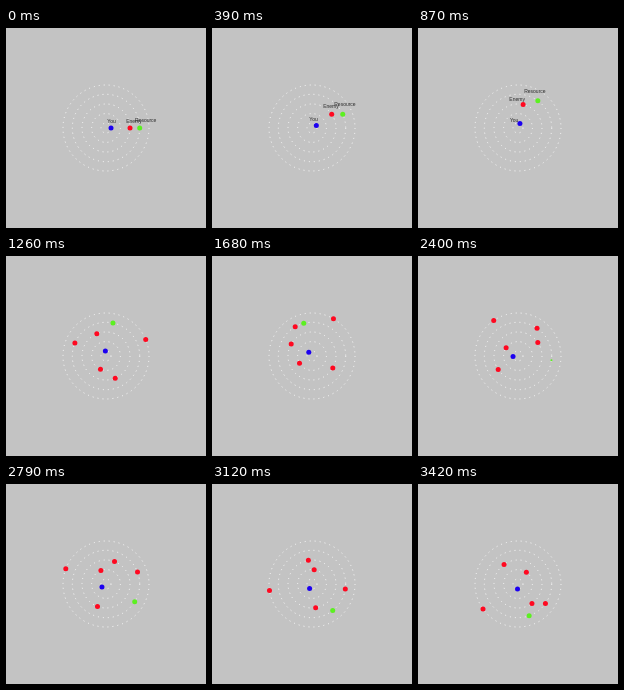
Recreate the animation shown at these times as an HTML page. Size 200 by 200 pixels, loop 3.52 s.

```html
<!DOCTYPE html>
<html lang="en">
<head>
<meta charset="utf-8">
<title>Orbits</title>
<style>
  html, body { margin: 0; height: 100%; overflow: hidden; background: #c3c3c3; }
  svg { display: block; width: 200px; height: 200px; }
  .ring { fill: none; stroke: #fff; stroke-width: .9; stroke-dasharray: 1 4; }
  text { font: 5px "Liberation Sans", Arial, sans-serif; fill: #2a2a2a; text-anchor: middle; }
</style>
</head>
<body>
<svg id="stage" viewBox="0 0 200 200"></svg>
<script>
const LOOP = 3520, STEP = 30, LAST = 114;
const CENTER = 100, DOT = 2.5;
const BLUE = '#1c00f0', RED = '#ff0820', GREEN = '#5cf021';
const ENEMY_SPEED = 2.68, RESOURCE_SPEED = 1.86, RESPAWN = 76;

const stage = document.getElementById('stage');

function add(tag, attrs) {
  const el = document.createElementNS('http://www.w3.org/2000/svg', tag);
  set(el, attrs);
  return stage.appendChild(el);
}

function set(el, attrs) {
  for (const key in attrs) el.setAttribute(key, attrs[key]);
}

const ramp = (n, from, to) => Math.min(1, Math.max(0, (n - from) / (to - from)));
const always = () => 1;
const enemySize = n => ramp(n, 30, 36);
const resourceSize = n => n < RESPAWN ? 1 - ramp(n, 70, RESPAWN) : ramp(n, RESPAWN, 86);

// The resource respawns at its starting point and circles the other way.
const resourceAngle = n => RESOURCE_SPEED * (n < RESPAWN ? n : RESPAWN - n);
const enemyAngle = (start, direction) => n => start + direction * ENEMY_SPEED * n;

for (const r of [5, 14.4, 24, 33.7, 43]) {
  add('circle', { class: 'ring', cx: CENTER, cy: CENTER, r });
}

// dx, dy: label centre relative to its body at angle zero.
const bodies = [
  { r: 5, color: BLUE, angle: n => 2.32 * n, size: always, label: 'You', dx: .5, dy: -6.5 },
  { r: 24, color: RED, angle: enemyAngle(0, 1), size: always, label: 'Enemy', dx: 4, dy: -7 },
  { r: 33.7, color: GREEN, angle: resourceAngle, size: resourceSize, label: 'Resource', dx: 6, dy: -8 },
  { r: 14.4, color: RED, angle: enemyAngle(0, -1), size: enemySize },
  { r: 24, color: RED, angle: enemyAngle(180, 1), size: enemySize },
  { r: 33.7, color: RED, angle: enemyAngle(270, -1), size: enemySize },
  { r: 43, color: RED, angle: enemyAngle(-90, 1), size: enemySize }
];

for (const body of bodies) body.dot = add('circle', { fill: body.color });
for (const body of bodies) {
  if (!body.label) continue;
  body.text = add('text', {});
  body.text.textContent = body.label;
}

// Rotates an offset counter-clockwise about the centre of the stage.
function orbit(x, y, degrees) {
  const a = degrees * Math.PI / 180, c = Math.cos(a), s = Math.sin(a);
  return [CENTER + x * c + y * s, CENTER - x * s + y * c];
}

function draw(time) {
  const n = Math.min(LAST, Math.floor(time % LOOP / STEP));
  const labelOpacity = 1 - ramp(n, 36, 42);
  for (const { r, angle, size, dot, text, dx, dy } of bodies) {
    const a = angle(n);
    const [cx, cy] = orbit(r, 0, a);
    set(dot, { cx, cy, r: DOT * size(n) });
    if (text) {
      const [x, y] = orbit(r + dx, dy, a);
      set(text, { x, y: y + 1.6, opacity: labelOpacity });
    }
  }
}

const start = performance.now();
function tick() {
  draw(performance.now() - start);
  requestAnimationFrame(tick);
}
tick();
</script>
</body>
</html>
```
